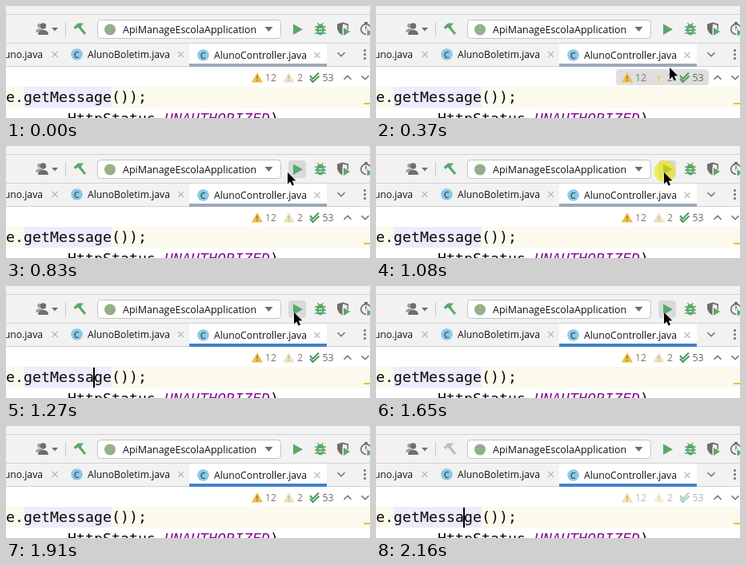
Recreate the animation shown at these times as an HTML page with a canvas. Size 455 by 140 pixels, loop 2.41 s.

```html
<!DOCTYPE html>
<html lang="en">
<head>
<meta charset="utf-8">
<title>Run button in an editor</title>
<style>
  html, body { margin: 0; width: 100%; height: 100%; overflow: hidden; background: #fff; }
  canvas { display: block; width: 455px; height: 140px; }
</style>
</head>
<body>
<canvas id="stage" width="455" height="140"></canvas>
<script>
const ctx = document.getElementById("stage").getContext("2d");
const LOOP = 2410;
const FOCUS = 1150, BUILD = 2090;
const UI = '"Open Sans", "Noto Sans", sans-serif';
const MONO = '"DejaVu Sans Mono", monospace';
const GREEN = "#59a869", GRAY = "#6e6e6e", LINE = "#d1d1d1", PANEL = "#f2f2f2";
const CODE_X = 0, CHAR = 11;

// Pointer tip: [start time, x, y]; no position means hidden.
const pointer = [
  [0], [300, 373, 100], [370, 367, 77], [440, 355, 54], [510, 347, 39],
  [580, 344, 34], [830, 352, 33], [880, 360, 33], [1770, 370, 121], [1840]
];

const during = (t, from, to) => t >= from && t < to;

function rect(x, y, w, h, color) {
  ctx.fillStyle = color;
  ctx.fillRect(x, y, w, h);
}

function round(x, y, w, h, r, fill, stroke) {
  ctx.beginPath();
  ctx.roundRect(x, y, w, h, r);
  ctx.fillStyle = fill;
  ctx.fill();
  if (stroke) {
    ctx.strokeStyle = stroke;
    ctx.lineWidth = 1;
    ctx.stroke();
  }
}

function disc(x, y, r, color) {
  ctx.beginPath();
  ctx.arc(x, y, r, 0, Math.PI * 2);
  ctx.fillStyle = color;
  ctx.fill();
}

function trace(points) {
  ctx.beginPath();
  points.forEach(([x, y], i) => i ? ctx.lineTo(x, y) : ctx.moveTo(x, y));
}

function poly(points, color) {
  trace(points);
  ctx.closePath();
  ctx.fillStyle = color;
  ctx.fill();
}

function line(points, color, width = 1.3) {
  trace(points);
  ctx.strokeStyle = color;
  ctx.lineWidth = width;
  ctx.stroke();
}

function text(str, x, y, font, color) {
  ctx.font = font;
  ctx.fillStyle = color;
  ctx.fillText(str, x, y);
}

const play = (x, y, w, h, color) =>
  poly([[x, y], [x + w, y + h / 2], [x, y + h]], color);

const arrowDown = (x, y, w, h) =>
  poly([[x - w / 2, y], [x + w / 2, y], [x, y + h]], GRAY);

const chevron = (x, y, dy) =>
  line([[x - 4.5, y - dy], [x, y + dy], [x + 4.5, y - dy]], GRAY, 1.5);

function person(x, y, s, color) {
  disc(x, y, 3.7 * s, color);
  ctx.beginPath();
  ctx.moveTo(x - 6.5 * s, y + 11 * s);
  ctx.bezierCurveTo(x - 6.5 * s, y + 3 * s, x + 6.5 * s, y + 3 * s, x + 6.5 * s, y + 11 * s);
  ctx.fill();
}

function hammer(color) {
  poly([[84.5, 26.5], [90, 21.5], [96.5, 21.5], [96.5, 23], [94, 24], [94.5, 26],
    [92, 28.5], [89.5, 26.5], [87, 29]], color);
  line([[91.5, 26], [99, 35]], color, 3);
}

function bug(x, y) {
  line([[x - 3.5, y - 8], [x - 1.5, y - 5]], GREEN);
  line([[x + 3.5, y - 8], [x + 1.5, y - 5]], GREEN);
  for (const dy of [-3, 1, 5]) {
    line([[x - 7, y + dy], [x + 7, y + dy]], GREEN, 1.5);
  }
  ctx.beginPath();
  ctx.ellipse(x, y + 0.5, 4.9, 7, 0, 0, Math.PI * 2);
  ctx.fillStyle = GREEN;
  ctx.fill();
  for (const dy of [-1, 2.5]) rect(x - 2.3, y + dy, 4.6, 1.2, PANEL);
}

function toolbar(t) {
  rect(0, 0, 455, 46, PANEL);
  rect(0, 10, 455, 1, LINE);
  rect(0, 46, 455, 1, LINE);

  person(42, 24.5, 0.75, "#a0a0a0");
  person(46.5, 25, 1, GRAY);
  arrowDown(61, 27, 8, 4.5);
  rect(74, 20, 1, 18, "#c9c9c9");
  hammer(t >= BUILD ? "#bdbdbd" : GREEN);

  round(114.5, 17.5, 229, 23, 4, "#fff", "#c4c4c4");
  disc(130, 29.5, 7, "#93b08a");
  text("ApiManageEscolaApplication", 146, 33.5, `12.5px ${UI}`, "#111");
  arrowDown(328.5, 26, 10, 6);

  if (during(t, 830, 1770)) round(353, 18, 22, 22, 4, "#d9d9d9");
  play(359, 22.5, 12, 13.5, GREEN);
  bug(393, 29);

  // Half-filled shield with a small run mark
  const shield = [[414, 22.5], [421, 20.5], [428, 22.5], [428, 29], [425.5, 33.5],
    [421, 37], [416.5, 33.5], [414, 29]];
  poly(shield, GRAY);
  poly([[421, 22.5], [426.5, 24], [426.5, 29], [424.5, 32.5], [421, 35]], PANEL);
  play(420.5, 25.5, 11, 13, PANEL);
  play(422, 27, 8, 10, GREEN);

  // Timer with a small run mark
  ctx.beginPath();
  ctx.arc(450, 29, 6.3, 0, Math.PI * 2);
  ctx.strokeStyle = GRAY;
  ctx.lineWidth = 1.7;
  ctx.stroke();
  line([[450, 25], [450, 29.5], [453, 29.5]], GRAY, 1.5);
  rect(448, 20, 4, 2, GRAY);
  play(450, 28, 9, 10, PANEL);
  play(451.5, 29.5, 7, 8, GREEN);
}

function closeMark(x, y) {
  line([[x - 3.5, y - 3.5], [x + 3.5, y + 3.5]], "#b5b5b5", 1.1);
  line([[x + 3.5, y - 3.5], [x - 3.5, y + 3.5]], "#b5b5b5", 1.1);
}

function tab(name, x, y, closeX, icon = true) {
  if (icon) {
    disc(x - 13.5, y, 7.3, "#8cc9e6");
    text("C", x - 17.3, y + 4, `600 11px ${UI}`, "#39515d");
  }
  text(name, x, y + 4, `12.2px ${UI}`, "#111");
  closeMark(closeX, y);
}

function tabs(t) {
  rect(0, 47, 455, 29, PANEL);
  rect(229, 47, 172, 29, "#fff");
  rect(0, 75, 455, 1, LINE);
  rect(229, 72, 172, 4, t < FOCUS ? "#9ca7b8" : "#4083c9");
  tab("uno.java", -2.3, 60.5, 61, false);
  tab("AlunoBoletim.java", 102, 60.5, 218.5);
  tab("AlunoController.java", 260, 61.5, 389);
  chevron(419, 60.5, 2.3);
  for (const dy of [-5, 0, 5]) disc(448.5, 60.5 + dy, 1.5, GRAY);
}

function warning(x, color, mark) {
  poly([[x, 83], [x + 7, 95.5], [x - 7, 95.5]], color);
  rect(x - 0.8, 87, 1.6, 4.3, mark);
  rect(x - 0.8, 92.5, 1.6, 1.5, mark);
}

function inspections(t) {
  if (during(t, 370, 440) || during(t, 1770, 1910)) {
    round(300, 79, 116, 20, 4, "#dfdfdf");
  }
  ctx.globalAlpha = t >= BUILD ? 0.5 : 1;
  const font = `12.3px ${UI}`, ink = "#7b786c", check = "#4f9a5c";
  warning(314, "#efbf45", "#8f7a3c");
  text("12", 324, 94, font, ink);
  warning(353.5, "#ece2be", "#c4bb9c");
  text("2", 364, 94, font, ink);
  line([[380, 87], [383.5, 91], [391, 83.5]], check, 2);
  line([[380, 91], [383.5, 95], [391.5, 87.5]], check, 2);
  text("53", 395.5, 94, font, "#666");
  ctx.globalAlpha = 1;
  chevron(427, 89.5, -2.3);
  chevron(449, 89.5, 2.3);
}

function code(t) {
  const col = n => CODE_X + n * CHAR;
  const font = `18.27px ${MONO}`;
  rect(0, 76, 455, 64, "#fff");
  rect(0, 101, 455, 26, "#fcfaed");
  rect(col(2), 101, 10 * CHAR, 26, "#edebfc");
  text("e.getMessage());", col(0), 120, font, "#080808");
  text("HttpStatus.", col(7), 146.5, font, "#080808");
  text("UNAUTHORIZED", col(18), 146.5, `italic ${font}`, "#871094");
  text(")", col(30), 146.5, font, "#080808");
  rect(447, 121, 8, 2, "#ebbf3c");
  if (during(t, FOCUS, 1650) || t >= 2160) rect(109, 102, 2, 25, "#000");
}

function arrow(t) {
  const [, x, y] = pointer.findLast(step => t >= step[0]);
  if (x === undefined) return;
  const shape = [[0, 0], [0, 14.5], [3.3, 11.5], [5.6, 16.6], [8, 15.5],
    [5.8, 10.5], [10.3, 10.3]].map(([dx, dy]) => [x + dx, y + dy]);
  trace(shape);
  ctx.closePath();
  ctx.strokeStyle = "#fff";
  ctx.lineWidth = 1;
  ctx.stroke();
  poly(shape, "#000");
}

function draw(now) {
  const t = now % LOOP;
  toolbar(t);
  tabs(t);
  code(t);
  inspections(t);
  if (during(t, 1080, 1270)) disc(361, 32, 13.5, "rgba(240, 230, 0, 0.62)");
  arrow(t);
}

const start = performance.now();
function tick() {
  draw(performance.now() - start);
  requestAnimationFrame(tick);
}
tick();
</script>
</body>
</html>
```
